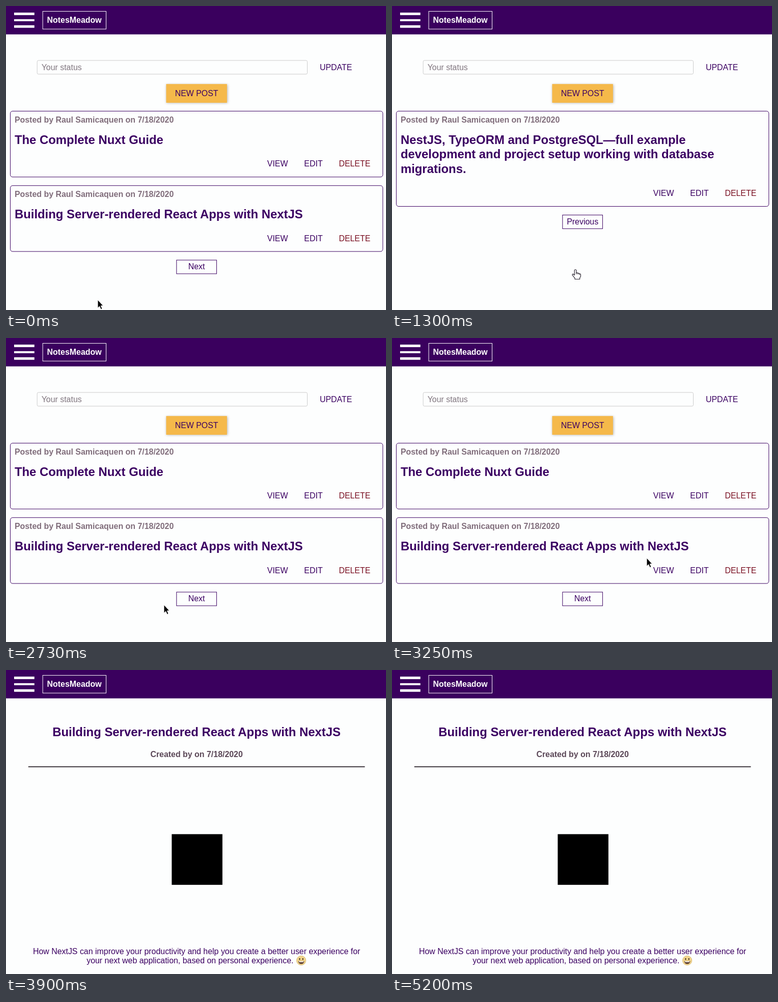
These frames come from a looping animation (746x597 px, 5460 ms). An HTML page:

```html
<!DOCTYPE html>
<html lang="en">
<head>
<meta charset="utf-8">
<title>Post feed</title>
<style>
html, body { margin: 0; width: 100%; height: 100%; overflow: hidden; background: #fdfefe; }
body { position: relative; font-family: "Liberation Sans", Arial, sans-serif; color: #3b0062; }
div, svg { position: absolute; box-sizing: border-box; }
svg { overflow: visible; }
.stage { left: 0; top: 0; width: 752px; height: 600px; transform: scale(.995); transform-origin: 0 0; }
.text { white-space: pre; font-size: 16px; line-height: 17px; }
.title { font-size: 24px; line-height: 27px; font-weight: bold; }
.bold { font-weight: bold; }
.mid { left: 0; width: 100%; text-align: center; }
.meta { color: #806d7b; }
.danger { color: #7a1022; }
.card { border: 1px solid #3b0062; border-radius: 5px; }
.nav { border: 1px solid currentColor; }
.hot { color: #f4b94c; }
.bar { background: #fff; }
</style>
</head>
<body>
<script>
const FRAME = 130, LOOP = 5460;

function box(parent, x, y, w, h, cls = '', style = '') {
  const el = document.createElement('div');
  el.className = cls;
  el.style.cssText = `left:${x}px;top:${y}px;width:${w}px;height:${h}px;${style}`;
  parent.append(el);
  return el;
}

// y is the baseline; x = null centres the line in its parent
function text(parent, str, x, y, cls = '') {
  const el = document.createElement('div');
  el.className = 'text ' + cls + (x === null ? ' mid' : '');
  el.textContent = str;
  if (x !== null) el.style.left = x + 'px';
  el.style.top = y - (cls.includes('title') ? 22 : 14) + 'px';
  parent.append(el);
  return el;
}

function drawing(parent, x, y, markup) {
  const el = document.createElementNS('http://www.w3.org/2000/svg', 'svg');
  el.setAttribute('width', 24);
  el.setAttribute('height', 24);
  el.style.cssText = `left:${x}px;top:${y}px`;
  el.innerHTML = markup;
  parent.append(el);
  return el;
}

// The layout is 752 by 600 and shown slightly reduced
const stage = document.createElement('div');
stage.className = 'stage';
document.body.append(stage);

function page() {
  return box(stage, 0, 0, 752, 600);
}

function card(parent, top, lines) {
  const extra = (lines.length - 1) * 29;
  box(parent, 8, top, 736, 131 + extra, 'card');
  text(parent, 'Posted by Raul Samicaquen on 7/18/2020', 17, top + 23, 'bold meta');
  lines.forEach((line, i) => text(parent, line, 17, top + 65 + i * 29, 'title'));
  const y = top + 110 + extra;
  text(parent, 'VIEW', 515.4, y);
  text(parent, 'EDIT', 588.3, y);
  text(parent, 'DELETE', 656.7, y, 'danger');
}

function navButton(parent, label, y) {
  const el = box(parent, 336, y, 80, 28, 'nav');
  text(el, label, null, 18);
  return el;
}

function feed() {
  const p = page();
  box(p, 61, 107, 534, 28, '', 'border:1px solid #ccc;border-radius:3px');
  text(p, 'Your status', 70, 127).style.color = '#80767f';
  text(p, 'UPDATE', 619, 127);
  box(p, 316, 154, 120, 37, '', 'background:#f5b94a;box-shadow:1px 1px 5px rgba(0,0,0,.28)');
  text(p, 'NEW POST', null, 178);
  return p;
}

const first = feed();
card(first, 207, ['The Complete Nuxt Guide']);
card(first, 354, ['Building Server-rendered React Apps with NextJS']);
const next = navButton(first, 'Next', 501);

const second = feed();
card(second, 207, [
  'NestJS, TypeORM and PostgreSQL\u2014full example',
  'development and project setup working with database',
  'migrations.'
]);
const previous = navButton(second, 'Previous', 412);

const detail = page();
text(detail, 'Building Server-rendered React Apps with NextJS', null, 131, 'title');
text(detail, 'Created by on 7/18/2020', null, 172, 'bold').style.color = '#5b4757';
box(detail, 44, 190, 664, 2, '', 'background:#443d44');
box(detail, 327, 324, 100, 100, '', 'background:#000');
text(detail, 'How NextJS can improve your productivity and help you create a better user experience for', null, 561);
text(detail, 'your next web application, based on personal experience.', 159, 579);
drawing(detail, 573, 564, `
  <circle cx="9.5" cy="9.3" r="9.2" fill="#f2d58c" stroke="#cfae6a" stroke-width=".7"/>
  <ellipse cx="6.3" cy="6.4" rx="1.2" ry="1.9" fill="#493622"/>
  <ellipse cx="12.7" cy="6.4" rx="1.2" ry="1.9" fill="#493622"/>
  <path d="M3.5 10.5H15.5Q14.5 16.2 9.5 16.2T3.5 10.5Z" fill="#5a3b2c"/>
  <path d="M4.6 10.9H14.4L13.6 12.6H5.4Z" fill="#fff"/>`);

// Header, above every page
box(stage, 0, 0, 752, 56, '', 'background:#3a005e');
for (const y of [13.1, 25.6, 38.1]) box(stage, 16, y, 40, 4.8, 'bar');
box(stage, 72, 10, 126, 36, '', 'border:1px solid #fff');
text(stage, 'NotesMeadow', 81, 33, 'bold').style.color = '#fff';

const arrow = drawing(document.body, 0, 0,
  '<path d="M0 0V16.2L3.7 12.8L6.3 18.7L9 17.5L6.4 11.8H11Z" fill="#000" stroke="#fff" stroke-width="1"/>');
const hand = drawing(document.body, 0, 0,
  `<path d="M-1.8 1.8Q0 -.8 1.8 1.8V7.3Q4 6.2 5 8Q7 7 8 9Q10.4 8.6 10.4 11V14L8.6 17V19.5H-1V17.4
   L-5.8 11.6Q-6.4 8.8 -4 9.5L-1.8 11.7Z" fill="#fff" stroke="#2a2530" stroke-width="1.2" stroke-linejoin="round"/>
   <path d="M1.8 7.3V10M5 8V10.3M8 9V11" stroke="#2a2530" fill="none"/>`);

// Pointer stops: time, x, y
const path = [
  [0, 180, 577], [650, 360, 517], [1430, 360, 517], [1950, 378, 431],
  [2210, 378, 431], [2730, 310, 524], [3250, 500, 432], [3510, 532, 456], [LOOP, 532, 456]
];

// From time: page, pointer, highlighted button
const scenes = [
  [0, first, arrow], [520, first, hand, next], [1040, second, hand],
  [1560, second, arrow], [1950, second, hand, previous],
  [2340, first, arrow], [3380, first, hand], [3640, detail]
];

function pointerAt(t) {
  const i = path.findIndex((p, k) => k > 0 && t < p[0]);
  const [t0, x0, y0] = path[i - 1], [t1, x1, y1] = path[i];
  const u = (t - t0) / (t1 - t0), e = u * u * (3 - 2 * u);
  return [Math.round(x0 + (x1 - x0) * e), Math.round(y0 + (y1 - y0) * e)];
}

function show(el, on) {
  el.style.display = on ? 'block' : 'none';
}

function draw(t) {
  const [, view, pointer, hot] = scenes.filter(s => s[0] <= t).pop();
  const [x, y] = pointerAt(t);
  for (const p of [first, second, detail]) show(p, p === view);
  for (const c of [arrow, hand]) {
    show(c, c === pointer);
    c.style.transform = `translate(${x}px,${y}px)`;
  }
  for (const b of [next, previous]) b.classList.toggle('hot', b === hot);
}

const start = performance.now();
function tick() {
  const t = (performance.now() - start) % LOOP;
  draw(Math.floor(t / FRAME) * FRAME);
  requestAnimationFrame(tick);
}
tick();
</script>
</body>
</html>
```
